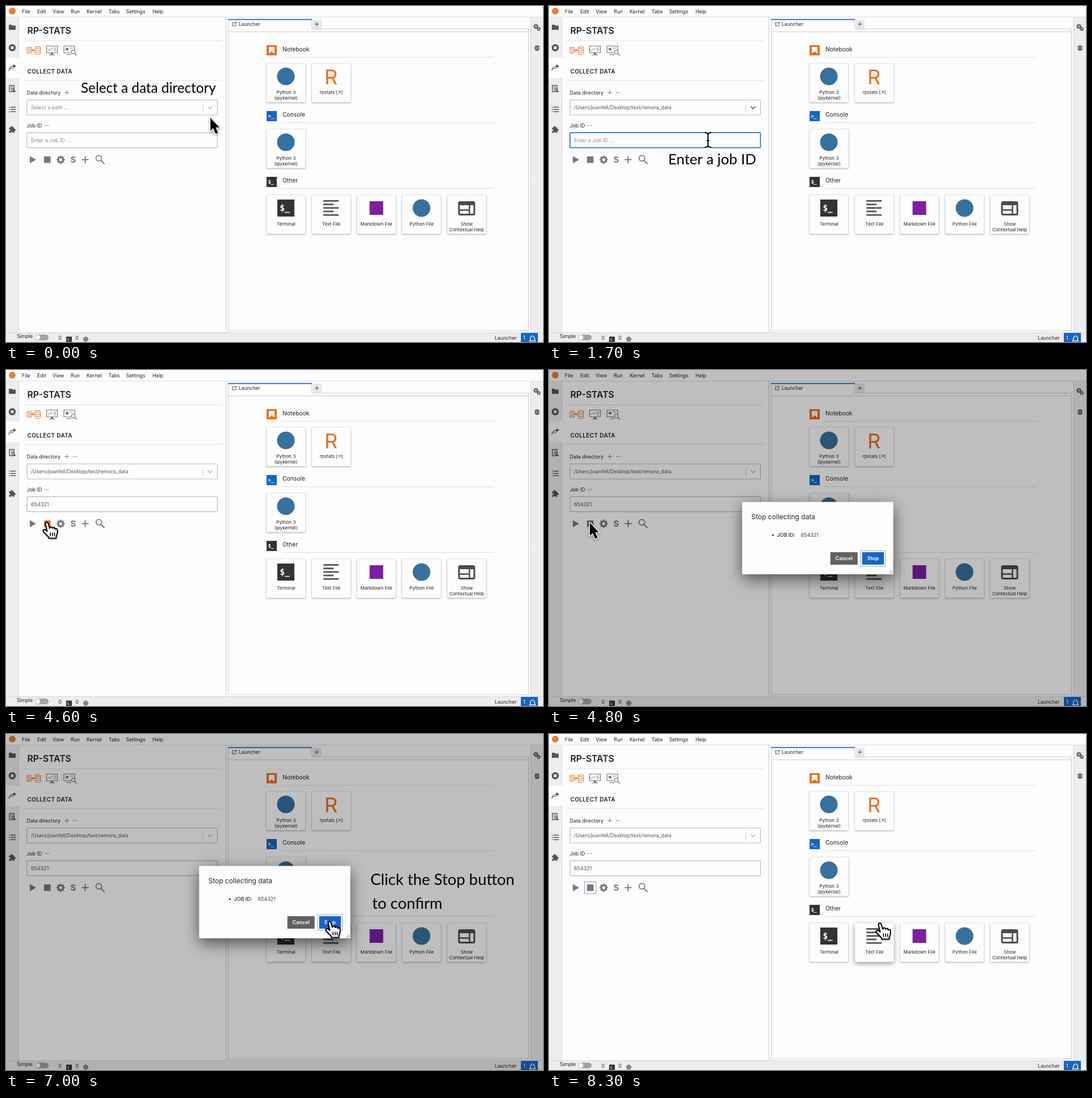
Recreate the animation shown at these times as an HTML page with a canvas. Size 946 by 592 pixels, loop 8400 ms.

```html
<!DOCTYPE html>
<html lang="en">
<head>
<meta charset="utf-8">
<title>Stopping a data collection job</title>
<style>
html, body { margin: 0; width: 100%; height: 100%; overflow: hidden; background: #fdfdfd; }
canvas { display: block; width: 946px; height: 592px; }
</style>
</head>
<body>
<canvas id="stage"></canvas>
<script>
const W = 946, H = 592, LOOP = 8400, STEP = 100;
const canvas = document.getElementById('stage');
const c = canvas.getContext('2d');
const ratio = window.devicePixelRatio || 1;
canvas.width = W * ratio;
canvas.height = H * ratio;

const SANS = 'Inter, sans-serif';
const MONO = '"DejaVu Sans Mono", monospace';
const CAPTION = 'Lato, sans-serif';
const PAPER = '#fdfdfd', BAR = '#ededed', ICON = '#555', TOOL = '#787878';
const BLUE = '#1565c8', ORANGE = '#ee6c1e', DARK = '#333336';
const PATH = '/Users/joanfell/Desktop/test/remora_data';

// drawing helpers
function box(x, y, w, h, color) {
  c.fillStyle = color;
  c.fillRect(x, y, w, h);
}
function frame(x, y, w, h, color, width = 1, r = 0) {
  c.strokeStyle = color;
  c.lineWidth = width;
  c.beginPath();
  c.roundRect(x, y, w, h, r);
  c.stroke();
}
function trace(points, closed) {
  c.beginPath();
  points.forEach(([x, y], i) => i ? c.lineTo(x, y) : c.moveTo(x, y));
  if (closed) c.closePath();
}
function line(points, color, width = 1) {
  trace(points);
  c.strokeStyle = color;
  c.lineWidth = width;
  c.stroke();
}
function poly(points, color) {
  trace(points, true);
  c.fillStyle = color;
  c.fill();
}
function disc(x, y, r, color) {
  c.beginPath();
  c.arc(x, y, r, 0, 7);
  c.fillStyle = color;
  c.fill();
}
function ring(x, y, r, color, width) {
  c.beginPath();
  c.arc(x, y, r, 0, 7);
  c.strokeStyle = color;
  c.lineWidth = width;
  c.stroke();
}
function text(s, x, y, size, { color = '#222', font = SANS, weight = 400, align = 'left', gap = 0 } = {}) {
  c.font = `${weight} ${size}px ${font}`;
  c.letterSpacing = gap + 'px';
  c.textAlign = align;
  c.fillStyle = color;
  c.fillText(s, x, y);
}
function shadowed(blur, dy, alpha, draw) {
  c.save();
  c.shadowColor = `rgba(0,0,0,${alpha})`;
  c.shadowBlur = blur * ratio;
  c.shadowOffsetY = dy * ratio;
  draw();
  c.restore();
}
function at(x, y, draw) {
  c.save();
  c.translate(x, y);
  draw();
  c.restore();
}
function gear(x, y, r, color, hole) {
  at(x, y, () => {
    for (let i = 0; i < 8; i++) {
      c.rotate(Math.PI / 4);
      box(-r * 0.2, -r, r * 0.4, r, color);
    }
    disc(0, 0, r * 0.78, color);
    disc(0, 0, r * 0.36, hole);
  });
}
function lens(x, y, r, color, width) {
  ring(x, y, r, color, width);
  const k = r * 0.72;
  line([[x + k, y + k], [x + r * 2, y + r * 2]], color, width * 1.2);
}
function plus(x, y, r, color, width) {
  line([[x - r, y], [x + r, y]], color, width);
  line([[x, y - r], [x, y + r]], color, width);
}
function dots(x, y) {
  for (let i = 0; i < 3; i++) disc(x + i * 3, y, 0.8, '#666');
}

// window chrome
function menuBar() {
  disc(11, 9, 6, '#ee7d32');
  const items = [['File', 28], ['Edit', 55], ['View', 82], ['Run', 114], ['Kernel', 142],
    ['Tabs', 180.5], ['Settings', 211.5], ['Help', 258]];
  items.forEach(([s, x]) => text(s, x, 13, 8.8));
}
function sidebars() {
  box(0, 19, 23, 556, BAR);
  box(0, 91, 23, 36, PAPER);
  line([[22.5, 19], [22.5, 91]], '#d8d8d8');
  line([[22.5, 127], [22.5, 575]], '#d8d8d8');
  box(924, 19, 22, 556, BAR);
  line([[924.5, 19], [924.5, 575]], '#d2d2d2');
  line([[0, 19.5], [W, 19.5]], '#dcdcdc');

  poly([[5, 33], [10, 33], [11.5, 34.5], [17, 34.5], [17, 42], [5, 42]], ICON);
  disc(11, 73.5, 6.3, ICON);
  box(8.5, 71, 5, 5, BAR);

  c.beginPath();
  c.moveTo(5, 114);
  c.quadraticCurveTo(6, 106, 15, 106);
  c.strokeStyle = ICON;
  c.lineWidth = 1.4;
  c.stroke();
  poly([[13, 102.5], [18, 106], [13, 109.5]], ICON);
  line([[8, 110.5], [13, 110]], ICON);

  frame(6, 140, 8, 11, ICON, 1.4);
  line([[8, 143], [12, 143]], ICON);
  line([[8, 146], [10, 146]], ICON);
  lens(12.5, 147, 2.2, ICON, 1.3);

  for (let i = 0; i < 3; i++) {
    box(5, 177.5 + i * 4, 1.6, 1.5, ICON);
    box(8, 177.5 + i * 4, 9, 1.5, ICON);
  }

  box(5.5, 214, 9, 9.5, ICON);
  disc(10, 213.5, 2, ICON);
  disc(15, 218.5, 2, ICON);
  disc(6, 218.7, 1.5, BAR);
  disc(10, 223.3, 1.5, BAR);

  gear(933.5, 36, 4.3, ICON, BAR);
  gear(938.5, 40.5, 3.4, ICON, BAR);
  for (let i = 0; i < 3; i++) line([[931, 71 + i * 3], [940, 71 + i * 3]], ICON, 1.2);
  c.beginPath();
  c.roundRect(932.5, 69.5, 6, 9.5, 3);
  c.fillStyle = ICON;
  c.fill();
  line([[934, 73], [937, 73]], BAR);
  line([[934, 75.5], [937, 75.5]], BAR);
}
function statusBar() {
  box(0, 575, W, 17, BAR);
  line([[0, 575.5], [W, 575.5]], '#d6d6d6');
  text('Simple', 19, 585, 8.8);
  c.beginPath();
  c.roundRect(51, 579, 24, 10, 5);
  c.fillStyle = '#a4a4a4';
  c.fill();
  disc(56, 584, 4.3, '#fff');
  text('0', 92.5, 588, 8.8);
  box(106, 582.5, 10, 9.5, DARK);
  text('$_', 107.5, 590, 6, { color: '#fff', font: MONO });
  text('0', 122.5, 588, 8.8);
  ring(140.5, 587, 3.4, ICON, 1.4);
  plus(140.5, 587, 4.8, ICON, 0.8);
  disc(140.5, 587, 1.6, ICON);
  text('Launcher', 861, 588, 8.7);
  box(907, 576, 30, 16, BLUE);
  text('1', 911, 588, 8.8, { color: '#fff' });
  c.beginPath();
  c.moveTo(922.5, 590);
  c.lineTo(924, 587);
  c.bezierCurveTo(923, 579.5, 932, 579.5, 931, 587);
  c.lineTo(932.5, 590);
  c.closePath();
  c.strokeStyle = '#fff';
  c.lineWidth = 1.3;
  c.stroke();
}

// left panel
function tabIcons() {
  frame(37, 73, 8, 10, ORANGE);
  for (let i = 0; i < 3; i++) line([[38.5, 75.5 + i * 2.5], [43, 75.5 + i * 2.5]], ORANGE, 0.9);
  line([[43, 78], [49, 78]], ORANGE, 1.3);
  poly([[47, 75.5], [50.5, 78], [47, 80.5]], ORANGE);
  for (let i = 0; i < 4; i++) {
    c.beginPath();
    c.ellipse(56, 73 + i * 3.6, 4.7, 1.6, 0, i ? 0 : Math.PI, i ? Math.PI : Math.PI * 3);
    c.strokeStyle = ORANGE;
    c.lineWidth = 1;
    c.stroke();
  }
  line([[51.3, 73], [51.3, 83.8]], ORANGE);
  line([[60.7, 73], [60.7, 83.8]], ORANGE);

  frame(71.5, 70.5, 19, 12, TOOL, 1.2);
  line([[74, 79], [77, 75.5], [79, 77.5], [82, 73.5]], TOOL);
  for (let i = 0; i < 3; i++) line([[84, 74 + i * 2.5], [88, 74 + i * 2.5]], TOOL, 0.9);
  box(79, 83, 4, 3, TOOL);
  box(76, 85.5, 10, 1.2, TOOL);

  frame(102, 70.5, 19, 12, TOOL, 1.2);
  disc(107.5, 76, 2.5, TOOL);
  line([[112, 74], [118, 74]], TOOL);
  box(107, 85, 8, 1.2, TOOL);
  disc(118.5, 81.5, 4, PAPER);
  lens(118.5, 81, 3.2, TOOL, 1.2);
}
function field(y, active) {
  box(37, y, 336, 27, PAPER);
  frame(37, y, 335.5, 26.5, active ? '#2470d8' : '#b9b9b9', active ? 1.7 : 1.2, 1.5);
}
function toolbar(s) {
  poly([[42, 264.5], [53, 270.7], [42, 277]], TOOL);
  box(67, 265, 11.5, 11.5, s.hoverStop ? '#f57313' : TOOL);
  if (s.focusStop) frame(62.5, 260.5, 20.5, 20.5, '#7d9fc4');
  gear(96.3, 270.8, 7.2, TOOL, PAPER);
  text('S', 118.5, 276, 15, { color: TOOL, weight: 700, align: 'center' });
  plus(139.5, 270.7, 6.2, TOOL, 1.9);
  lens(163.5, 268.3, 5, TOOL, 1.7);
}
function leftPanel(s) {
  text('RP-STATS', 37.5, 49, 15.8, { weight: 600 });
  line([[29, 61.5], [380, 61.5]], '#e2e2e2');
  tabIcons();
  text('COLLECT DATA', 37.5, 118.7, 10, { weight: 600, gap: 0.35 });
  line([[29, 131], [380, 131]], '#e2e2e2');

  text('Data directory', 36.5, 156, 8.9);
  plus(107, 152.5, 3.8, '#777', 1);
  if (s.chosen) dots(119, 152.5);
  field(165.5, false);
  text(s.chosen ? PATH : 'Select a path ...', 44, 182, s.chosen ? 8.8 : 9.1,
    { color: s.chosen ? '#555' : '#8a8a8a' });
  line([[347, 170], [347, 188]], '#ccc');
  line([[355.5, 177], [359.5, 181], [363.5, 177]], s.openList ? '#555' : '#bbb', 1.6);

  text('Job ID', 36.5, 213.5, 8.8);
  dots(68.5, 210.5);
  field(223.2, s.editing);
  text(s.id || 'Enter a Job ID ...', 44, 240, 9, { color: s.id ? '#555' : '#8a8a8a' });
  if (s.editing && s.id) {
    const x = 44.5 + c.measureText(s.id).width;
    line([[x, 231], [x, 242]], '#222');
  }
  toolbar(s);
  line([[387.5, 19], [387.5, 575]], '#c9c9c9');
}

// launcher
function section(y, title) {
  text(title, 487, y, 10.3);
  line([[487, y + 10.3], [859, y + 10.3]], '#dedede');
}
function card(x, y, labels, raised) {
  shadowed(raised ? 9 : 3, raised ? 3 : 1, raised ? 0.4 : 0.38, () => {
    c.beginPath();
    c.roundRect(x, y, 68.5, 68.5, 1);
    c.fillStyle = PAPER;
    c.fill();
  });
  frame(x, y, 68.5, 68.5, '#e0e0e0', 0.6, 1);
  labels.forEach((s, i) => text(s, x + 34.3, y + 54.3 + i * 9.5, 8.1, { align: 'center' }));
}
function shell(x, y, size, font, sign, color) {
  box(x, y, size, size, color);
  text(sign, x + size * 0.14, y + size * 0.66, font, { color: '#fff', font: MONO, weight: 700, gap: -0.4 });
}
function launcher(s) {
  box(391, 23, 148, 18, PAPER);
  box(540, 24, 16, 16, '#e8e8e8');
  line([[391.5, 41], [391.5, 23]], '#d0d0d0');
  line([[538.5, 41], [538.5, 23]], '#d0d0d0');
  line([[539, 40.5], [920.5, 40.5]], '#d0d0d0');
  frame(391.5, 45.5, 529, 526.5, '#cdcdcd');
  line([[391.5, 41], [391.5, 46]], '#cdcdcd');
  line([[920.5, 41], [920.5, 46]], '#cdcdcd');
  box(391, 22.8, 148, 2, '#3a78cf');
  line([[402, 29], [399, 29], [399, 35], [405, 35], [405, 32.5]], ICON);
  line([[401.5, 32.5], [405.3, 28.7]], ICON);
  line([[403, 28.7], [405.5, 28.7], [405.5, 31]], ICON);
  text('Launcher', 410, 35, 8.6);
  plus(547.5, 32, 3.3, '#444', 1);

  section(80, 'Notebook');
  box(459, 69, 18, 18, ORANGE);
  poly([[463, 72], [473, 72], [473, 84], [468, 79.8], [463, 84]], '#fff');
  card(459, 101, ['Python 3', '(ipykernel)']);
  disc(493, 124, 15.5, '#36719f');
  card(538.8, 101, ['rpstats [↗]']);
  text('R', 572.7, 137.5, 36, { color: ORANGE, align: 'center' });

  section(195.3, 'Console');
  shell(459, 185, 18, 9, '>_', BLUE);
  card(459, 217, ['Python 3', '(ipykernel)']);
  disc(493, 240, 15.5, '#36719f');

  section(311, 'Other');
  shell(459, 301, 18, 9, '$_', DARK);
  card(459, 333, ['Terminal']);
  shell(478, 341, 30, 15, '$_', DARK);
  card(538.8, 333, ['Text File'], s.raised);
  for (let i = 0; i < 5; i++) box(559, 342 + i * 6.2, i % 2 ? 18 : 27, 2.8, '#555');
  card(618.3, 333, ['Markdown File']);
  box(640.5, 344, 24, 24, '#7b1fa2');
  card(697.8, 333, ['Python File']);
  disc(732, 356, 15.5, '#36719f');
  card(777.3, 333, ['Show', 'Contextual Help']);
  frame(798, 345.5, 27, 22, '#4a4a4a', 3, 2);
  box(798, 345, 27, 6, '#4a4a4a');
  line([[798, 359.5], [816, 359.5]], '#4a4a4a', 2.5);
  line([[816.5, 350], [816.5, 367]], '#4a4a4a', 2.5);
}

// dialogs
function dialog(x, y, w, h, title) {
  box(0, 0, W, H, 'rgba(0,0,0,0.25)');
  shadowed(26, 8, 0.6, () => box(x, y, w, h, '#fff'));
  box(x, y, w, h, PAPER);
  text(title, x + 16, y + 30.3, 12);
  line([[x + w - 7, y + h - 1], [x + w - 1, y + h - 7]], '#777', 0.9);
  line([[x + w - 4, y + h - 1], [x + w - 1, y + h - 4]], '#777', 0.9);
}
function button(x, y, w, label, color, focused) {
  if (focused) frame(x - 2.7, y - 2.7, w + 5.4, 27.4, '#8fb0d8', 1.1);
  box(x, y, w, 22, color);
  text(label, x + w / 2, y + 14.2, 9, { color: '#fff', weight: 600, align: 'center' });
}
function confirmDialog() {
  dialog(340.5, 232.7, 265.8, 127, 'Stop collecting data');
  disc(394.5, 291, 1.5, '#222');
  text('JOB ID:', 401.5, 294, 9, { weight: 600, color: '#444' });
  text('654321', 443.5, 294, 9, { color: '#444' });
  button(495.7, 321, 48, 'Cancel', '#616161');
  button(551.7, 321, 38.3, 'Stop', BLUE, true);
}
function sentDialog(t) {
  dialog(325.8, 236.5, 295.5, 119, 'RP-STATS');
  text('Stop signal has been sent to job 654321', 359, 294, 9.58, { font: MONO });
  button(575.5, 317, 29.5, 'Ok', t >= 7800 ? '#1159b4' : BLUE, true);
}

// captions: [from, to, size, [text, x, baseline]...]
const captions = [
  [0, 600, 24.3, ['Select a data directory', 132, 153]],
  [1100, 2600, 25.7, ['Enter a job ID', 210, 279]],
  [2700, 4400, 25.6, ['Click', 191, 282], ['to stop', 291.5, 282], ['data collection', 193, 317]],
  [5100, 7200, 27.4, ['Click the Stop button', 642, 266], ['to confirm', 645, 308]],
];
function caption(t) {
  captions.forEach(([from, to, size, ...lines]) => {
    if (t < from || t >= to) return;
    lines.forEach(([s, x, y]) => text(s, x, y, size, { color: '#000', font: CAPTION }));
    if (from === 2700) box(255.5, 263, 21, 20, '#000');
  });
}

// pointer: [time, x, y]
const track = [
  [0, 360, 197], [400, 359, 180], [600, 359, 180], [1000, 290, 208], [1500, 280, 236],
  [2500, 280, 236], [2900, 153, 295], [3500, 72, 269], [5300, 72, 269], [6200, 496, 303],
  [6700, 570, 331], [7400, 570, 331], [7800, 583, 334], [8400, 583, 334],
];
function pointerAt(t) {
  const i = track.findIndex(k => k[0] > t);
  const [t0, x0, y0] = track[i - 1], [t1, x1, y1] = track[i];
  const p = (t - t0) / (t1 - t0), e = p * p * (3 - 2 * p);
  return [x0 + (x1 - x0) * e, y0 + (y1 - y0) * e];
}
function arrow() {
  const shape = [[0, 0], [0, 23], [5, 18.6], [9.3, 28.3], [13.6, 26.4], [9.4, 17], [16, 17]];
  c.lineJoin = 'round';
  shadowed(4, 1.5, 0.4, () => {
    trace(shape, true);
    c.strokeStyle = '#fff';
    c.lineWidth = 2.6;
    c.stroke();
  });
  poly(shape, '#000');
}
function beam() {
  const draw = (color, width) => {
    for (const k of [-1, 1]) {
      c.beginPath();
      c.moveTo(-6, 13 * k);
      c.quadraticCurveTo(0, 13 * k, 0, 9 * k);
      c.quadraticCurveTo(0, 13 * k, 6, 13 * k);
      c.strokeStyle = color;
      c.lineWidth = width;
      c.stroke();
    }
    line([[0, -10], [0, 10]], color, width);
    line([[-2.5, 1], [2.5, 1]], color, width);
  };
  draw('#fff', 4);
  draw('#000', 2);
}
function hand() {
  c.beginPath();
  c.moveTo(-2.5, 2.5);
  c.bezierCurveTo(-3, -1.5, 1.5, -2, 2.5, 1.5);
  c.lineTo(5, 10);
  c.bezierCurveTo(6, 6.5, 9.5, 7, 10, 10);
  c.bezierCurveTo(11.5, 7.5, 14.5, 8.5, 14.5, 11.5);
  c.bezierCurveTo(16.5, 9.5, 19, 11, 18.7, 14);
  c.bezierCurveTo(18.8, 20, 17.5, 21, 16.5, 24);
  c.lineTo(16.5, 27.5);
  c.lineTo(3.5, 27.5);
  c.lineTo(3, 25);
  c.bezierCurveTo(-1, 22, -4, 18, -6.5, 15);
  c.bezierCurveTo(-7.5, 12, -4, 11, -2, 13);
  c.lineTo(0.5, 15);
  c.closePath();
  c.lineJoin = 'round';
  shadowed(4, 1.5, 0.4, () => {
    c.fillStyle = '#fff';
    c.fill();
  });
  c.strokeStyle = '#000';
  c.lineWidth = 2;
  c.stroke();
  for (let i = 0; i < 3; i++) line([[6 + i * 3.7, 17.5], [6.2 + i * 3.7, 23.5]], '#000', 1.6);
}
function pointer(t) {
  const [x, y] = pointerAt(t);
  const onField = t >= 1300 && t < 2600;
  const onButton = (t >= 3400 && t < 4800) || (t >= 6600 && t < 7300) || t >= 7800;
  at(x, y, onField ? beam : onButton ? hand : arrow);
}

function render(t) {
  const s = {
    chosen: t >= 1000,
    openList: t >= 500 && t < 1800,
    editing: t >= 1600 && t < 4400,
    id: '654321'.slice(0, Math.max(0, Math.floor((t - 1780) / 120))),
    hoverStop: t >= 3400 && t < 4800,
    focusStop: t >= 8100,
    raised: t >= 8100,
  };
  c.setTransform(ratio, 0, 0, ratio, 0, 0);
  box(0, 0, W, H, PAPER);
  menuBar();
  sidebars();
  leftPanel(s);
  launcher(s);
  statusBar();
  if (t >= 4800 && t < 7300) confirmDialog();
  if (t >= 7500 && t < 8100) sentDialog(t);
  caption(t);
  pointer(t);
}

const start = performance.now();
function tick() {
  const t = (performance.now() - start) % LOOP;
  render(Math.floor(t / STEP) * STEP);
  requestAnimationFrame(tick);
}
tick();
</script>
</body>
</html>
```
